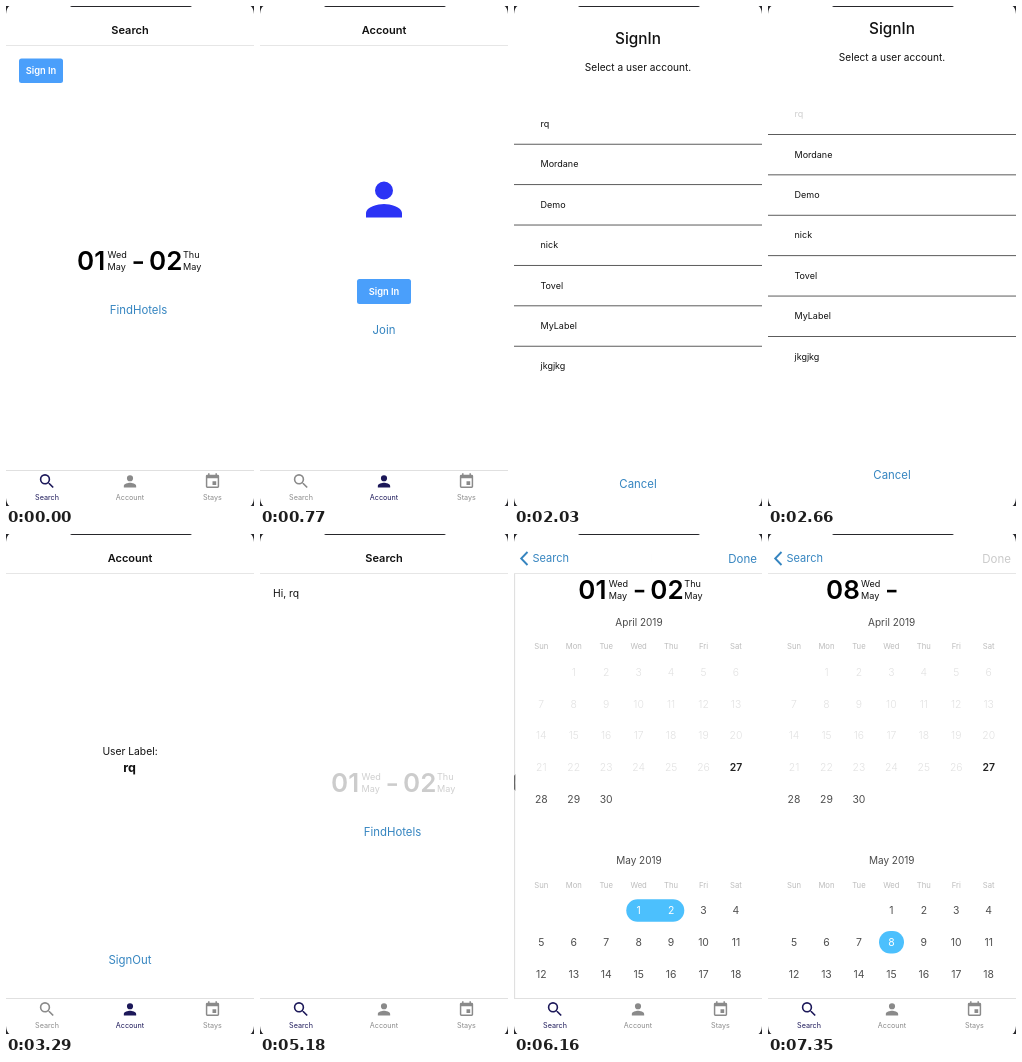
Animation, 248 px wide and 500 px high, one loop 8000 ms. Source, as an HTML page with a canvas:

```html
<!DOCTYPE html>
<html lang="en">
<head>
<meta charset="utf-8">
<title>Hotel search app</title>
<style>
  html, body { margin: 0; width: 100%; height: 100%; overflow: hidden; background: #fff; }
  canvas { display: block; width: 248px; height: 500px; }
</style>
</head>
<body>
<canvas id="stage"></canvas>
<script>
const W = 248, H = 500, LOOP = 8000, STEP = 70;
const HEAD = 39, TABS = 464;
const INK = '#111', LINK = '#3585c0', NAVY = '#1c1859', GREY = '#8a8a8a', BUTTON = '#4a9ffb';
const USER = 'rq';
const ACCOUNTS = [USER, 'Mordane', 'Demo', 'nick', 'Tovel', 'MyLabel', 'jkgjkg'];
const WEEK = ['Sun', 'Mon', 'Tue', 'Wed', 'Thu', 'Fri', 'Sat'];

const ICONS = {
  search: new Path2D('M15.5 14h-.79l-.28-.27A6.47 6.47 0 0 0 16 9.5 6.5 6.5 0 1 0 9.5 16c1.61 0 3.09-.59 4.23-1.57l.27.28v.79l5 4.99L20.49 19zm-6 0a4.5 4.5 0 1 1 0-9 4.5 4.5 0 0 1 0 9z'),
  person: new Path2D('M12 12a4 4 0 1 0 0-8 4 4 0 0 0 0 8zm0 2c-2.67 0-8 1.34-8 4v2h16v-2c0-2.66-5.33-4-8-4z'),
  event: new Path2D('M17 12h-5v5h5zM16 1v2H8V1H6v2H5a2 2 0 0 0-2 2v14a2 2 0 0 0 2 2h14a2 2 0 0 0 2-2V5a2 2 0 0 0-2-2h-1V1zm3 18H5V8h14z')
};

const canvas = document.getElementById('stage');
const ctx = canvas.getContext('2d');
const ratio = window.devicePixelRatio || 1;
canvas.width = W * ratio;
canvas.height = H * ratio;

const clamp = v => Math.min(1, Math.max(0, v));

// Critically damped spring from 0 to 1; t in ms
function spring(t) {
  if (t <= 0) return 0;
  const k = 0.01826 * t;
  return 1 - (1 + k) * Math.exp(-k);
}

function rect(x, y, w, h, color) {
  ctx.fillStyle = color;
  ctx.fillRect(x, y, w, h);
}

function pill(x, y, w, h, r, color) {
  ctx.fillStyle = color;
  ctx.beginPath();
  ctx.roundRect(x, y, w, h, r);
  ctx.fill();
}

// y is the middle of the capital letters
function text(str, x, y, size, color = INK, weight = 400, align = 'center') {
  ctx.font = `${weight} ${size}px Inter, Roboto, sans-serif`;
  ctx.fillStyle = color;
  ctx.textAlign = align;
  ctx.fillText(str, x, y + size * 0.363);
}

function icon(shape, cx, cy, scale, color) {
  ctx.save();
  ctx.translate(cx - 12 * scale, cy - 12 * scale);
  ctx.scale(scale, scale);
  ctx.fillStyle = color;
  ctx.fill(ICONS[shape], 'evenodd');
  ctx.restore();
}

function layer(alpha, draw, dx = 0, dy = 0) {
  ctx.save();
  ctx.globalAlpha *= alpha;
  ctx.translate(dx, dy);
  draw();
  ctx.restore();
}

const link = (str, x, y) => text(str, x, y, 11.4, LINK);
const title = str => text(str, 124, 24, 11, INK, 600);

function headerBar() {
  rect(0, 0, W, HEAD, '#fff');
  rect(0, HEAD, W, 1, '#e6e6e6');
}

function tabBar(active) {
  rect(0, TABS, W, H - TABS, '#fff');
  rect(0, TABS, W, 1, '#e0e0e0');
  const tabs = [['Search', 'search', 41, 0.8], ['Account', 'person', 124, 0.77], ['Stays', 'event', 206.5, 0.74]];
  tabs.forEach(([label, shape, x, scale], i) => {
    const color = i === active ? NAVY : GREY;
    icon(shape, x, 475.3, scale, color);
    text(label, x, 491, 7.2, color);
  });
}

function signInButton(x, y, w, h) {
  pill(x, y, w, h, 2.5, BUTTON);
  text('Sign In', x + w / 2, y + h / 2, 9.3, '#fff', 600);
}

function dateLabel(day, weekday, x, split, y) {
  text(day, x, y, 26, '#000', 600, 'left');
  text(weekday, split, y - 6, 9.1, INK, 400, 'left');
  text('May', split, y + 5.7, 9.1, INK, 400, 'left');
}

function dateRange(x, y) {
  dateLabel('01', 'Wed', x - 1, x + 29.5, y);
  rect(x + 55.5, y + 0.3, 9.5, 2.6, '#000');
  dateLabel('02', 'Thu', x + 71, x + 105, y);
}

function searchBody(signedIn, dateAlpha) {
  rect(0, HEAD + 1, W, TABS - HEAD - 1, '#fff');
  const y = signedIn ? 249 : 255;
  if (signedIn) text('Hi, ' + USER, 13, 59.5, 10.3, INK, 400, 'left');
  else signInButton(13, 52.5, 44, 24.5);
  layer(dateAlpha, () => dateRange(72, y));
  link('FindHotels', 132.5, y + 48.5);
}

function accountScreen(signedIn, buttonAlpha) {
  headerBar();
  title('Account');
  if (signedIn) {
    text('User Label:', 124, 217.5, 10.3);
    text(USER, 123.5, 233, 12.5, INK, 700);
    link('SignOut', 124, 425.5);
  } else {
    icon('person', 124, 193.5, 2.25, '#2b33f5');
    layer(buttonAlpha, () => signInButton(97, 273, 54, 25));
    link('Join', 124, 324);
  }
  tabBar(1);
}

function accountPicker(pressed) {
  rect(0, 0, W, H, '#fff');
  text('SignIn', 124, 22.5, 15.3, INK, 500);
  text('Select a user account.', 124, 51.5, 10.1);
  ACCOUNTS.forEach((label, i) => {
    const y = 108 + 40.4 * i;
    layer(i === 0 && pressed ? 0.2 : 1, () => text(label, 26.5, y, 9, INK, 400, 'left'));
    if (i < ACCOUNTS.length - 1) rect(0, y + 20, W, 0.9, '#4a4a4a');
  });
  link('Cancel', 124, 468.5);
}

function month(label, y, firstCol, lastDay, style) {
  text(label, 123.7, y, 10, '#4a4a4a');
  WEEK.forEach((d, c) => text(d, 26 + 32.45 * c, y + 24.5, 7.7, '#bcbcbc'));
  for (let d = 1; d <= lastDay; d++) {
    const cell = d - 1 + firstCol;
    const [color, weight] = style(d);
    text(d, 26 + 32.45 * (cell % 7), y + 50 + 31.75 * Math.floor(cell / 7), 10.4, color, weight);
  }
}

function calendar(picked) {
  rect(0, HEAD + 1, W, TABS - HEAD - 1, '#fff');
  if (picked) {
    dateLabel('08', 'Wed', 58, 93, 55.5);
    rect(119, 55.8, 9.5, 2.6, '#000');
    pill(111, 397, 25, 22.5, 11.2, '#4cc0fd');
  } else {
    dateRange(64, 55.5);
    pill(111, 365.3, 58, 22.5, 11.2, '#4cc0fd');
  }
  month('April 2019', 88, 1, 30, d =>
    d < 27 ? ['#e2e2e2', 300] : d === 27 ? ['#222', 600] : ['#505050', 400]);
  month('May 2019', 326.7, 3, 18, d =>
    (picked ? d === 8 : d < 3) ? ['#fff', 400] : ['#505050', 400]);
}

function calendarHeader(picked) {
  ctx.strokeStyle = LINK;
  ctx.lineWidth = 1.9;
  ctx.beginPath();
  ctx.moveTo(13.5, 18);
  ctx.lineTo(7.2, 24.5);
  ctx.lineTo(13.5, 31);
  ctx.stroke();
  text('Search', 18.5, 24.5, 11, LINK, 400, 'left');
  text('Done', 243, 24.5, 11.5, picked ? '#cacaca' : LINK, 400, 'right');
}

function searchTab(t) {
  const push = t < 5810 ? 0 : t >= 6370 ? 1 : spring(t - 5755);
  const picked = t >= 7350;
  const dateAlpha = t < 5180 ? 1 : 0.2 + 0.8 * clamp((t - 5780) / 250);
  layer(1, () => searchBody(t >= 4340, dateAlpha), -0.3 * W * push);
  if (push > 0) {
    layer(1, () => {
      if (push < 1) rect(-0.8, HEAD + 1, 0.8, TABS - HEAD, '#c4c4c4');
      calendar(picked);
    }, W * (1 - push));
  }
  headerBar();
  layer(1 - push, () => title('Search'));
  layer(push, () => calendarHeader(picked));
  tabBar(0);
}

function accountTab(t) {
  const fade = clamp((t - 1080) / 460);
  accountScreen(t >= 2660, 1 - 0.73 * fade * fade * (3 - 2 * fade));
  if (t < 1750 || t >= 3290) return;
  const shown = t < 3010 ? (t >= 2310 ? 1 : spring(t - 1709)) : 1 - spring(t - 2970);
  layer(1, () => accountPicker(t >= 2660), 0, H * (1 - shown));
}

// Notch and rounded corners of the phone
function bezel() {
  pill(64, -3, 122, 4, 2, '#26262a');
  for (const [x, y, sx, sy] of [[0, 0, 1, 1], [W, 0, -1, 1], [0, H, 1, -1], [W, H, -1, -1]]) {
    ctx.fillStyle = '#26262a';
    ctx.beginPath();
    ctx.moveTo(x, y);
    ctx.lineTo(x + 3.5 * sx, y);
    ctx.quadraticCurveTo(x + 0.6 * sx, y + 1.5 * sy, x, y + 8 * sy);
    ctx.fill();
  }
}

function draw(now) {
  const t = Math.floor((now % LOOP + 0.5) / STEP) * STEP;
  ctx.setTransform(ratio, 0, 0, ratio, 0, 0);
  rect(0, 0, W, H, '#fff');
  if (t >= 770 && t < 4340) accountTab(t);
  else searchTab(t);
  bezel();
}

let start = null;
function tick(now) {
  if (start === null) start = now;
  draw(Math.max(0, now - start));
  requestAnimationFrame(tick);
}
draw(0);
requestAnimationFrame(tick);
</script>
</body>
</html>
```
